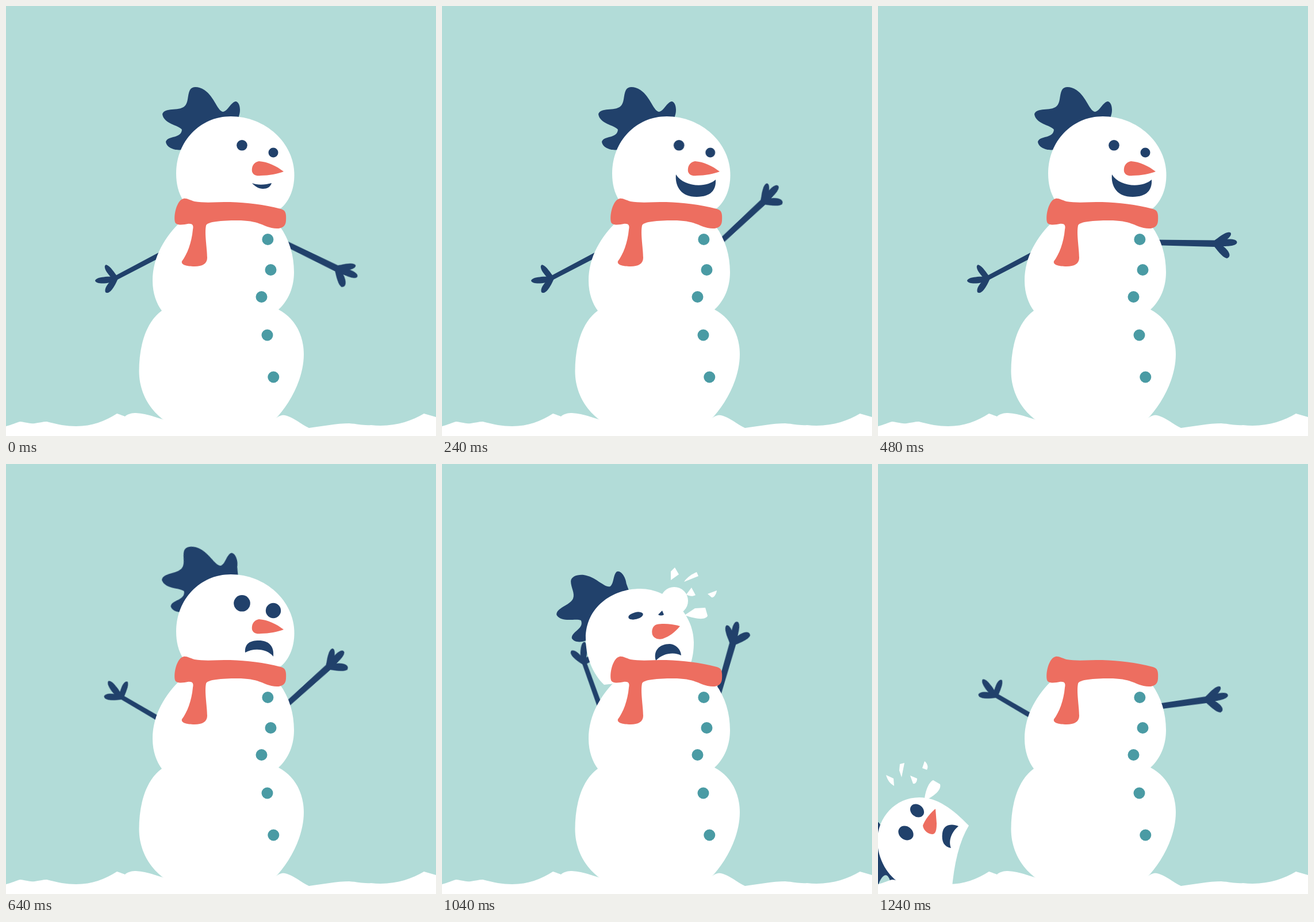
Animation, 748 px wide and 748 px high, one loop 1.34 s. Source, as an HTML page:

```html
<!DOCTYPE html>
<html lang="en">
<head>
<meta charset="utf-8">
<title>Snowman</title>
<style>
  html, body { margin: 0; width: 100%; height: 100%; overflow: hidden; background: #b2dcd8; }
  svg { display: block; width: 100vw; height: 100vh; }

  .navy { fill: #21416b; }
  .coral { fill: #ed6e60; }
  .teal { fill: #4a9ba4; }
  .white { fill: #fff; }

  .anim { animation: 1340ms step-end infinite; }
  .arm-r { animation-name: arm-r; transform-origin: 483px 411px; }
  .arm-l { animation-name: arm-l; transform-origin: 257px 438px; }
  .hair { animation-name: hair; transform-origin: 337px 179px; }
  .eyes { animation-name: glance; }
  .smile { animation-name: smile; }
  .grin { animation-name: grin; transform-origin: 444px 309px; }
  .calm { animation-name: calm; }
  .scared { animation-name: scared; }
  .head { animation-name: head; }
  .hit { animation-name: hit; }
  .fallen { animation-name: fallen; transform-origin: 75px 660px; }
  .ball { animation-name: ball; }

  @keyframes arm-r {
    0% { transform: rotate(25deg); }
    4.47% { transform: rotate(14deg); }
    8.95% { transform: rotate(-8deg); }
    13.43% { transform: rotate(-30deg); }
    17.91% { transform: rotate(-44deg); }
    22.38% { transform: rotate(-46deg); }
    26.86% { transform: rotate(-38deg); }
    31.34% { transform: rotate(-20deg); }
    35.82% { transform: rotate(0deg); }
    40.29% { transform: rotate(-6deg); }
    47.76% { transform: translate(1px, 11px) rotate(-43deg); }
    55.22% { transform: translate(4px, 20px) rotate(-61deg); }
    62.68% { transform: translate(7px, 27px) rotate(-75deg); }
    70.14% { transform: translate(3px, 16px) rotate(-76deg); }
    77.61% { transform: translate(-6px, 0) rotate(-75deg); }
    85.07% { transform: translate(-10px, 8px) rotate(-58deg); }
    92.53%, 100% { transform: translate(-14px, 13px) rotate(-9deg); }
  }
  @keyframes arm-l {
    0% { transform: none; }
    47.76% { transform: translate(9px, 5px) rotate(58deg); }
    55.22% { transform: translate(8px, 3px) rotate(71deg); }
    62.68% { transform: translate(6px, 1px) rotate(82deg); }
    70.14% { transform: translate(10px, -9px) rotate(90deg); }
    77.61% { transform: translate(16px, -22px) rotate(98deg); }
    85.07% { transform: translate(15px, -12px) rotate(82deg); }
    92.53%, 100% { transform: translate(13px, 2px) rotate(58deg); }
  }
  @keyframes hair {
    0% { transform: none; }
    47.76% { transform: translate(-4px, 1px) rotate(-11.5deg); }
    55.22% { transform: translate(-2px, 0) rotate(-5deg); }
    62.68%, 100% { transform: none; }
  }
  @keyframes glance {
    0% { transform: none; }
    13.43% { transform: translateX(1.7px); }
    31.34%, 100% { transform: none; }
  }
  @keyframes smile {
    0% { opacity: 1; }
    4.47%, 100% { opacity: 0; }
  }
  @keyframes grin {
    0% { opacity: 0; transform: scale(.5); }
    4.47% { opacity: 1; transform: scale(.6); }
    8.95% { opacity: 1; transform: scale(.75); }
    13.43% { opacity: 1; transform: scale(.9); }
    17.91%, 100% { opacity: 1; transform: none; }
  }
  @keyframes calm {
    0% { opacity: 1; }
    47.76%, 100% { opacity: 0; }
  }
  @keyframes scared {
    0% { opacity: 0; }
    47.76%, 100% { opacity: 1; }
  }
  @keyframes head {
    0% { opacity: 1; }
    77.61%, 100% { opacity: 0; }
  }
  @keyframes hit {
    0% { opacity: 0; }
    77.61% { opacity: 1; }
    85.07%, 100% { opacity: 0; }
  }
  @keyframes fallen {
    0% { opacity: 0; transform: none; }
    85.07% { opacity: 1; transform: translate(120px, -220px) rotate(33deg); }
    92.53%, 100% { opacity: 1; transform: none; }
  }
  @keyframes ball {
    0% { opacity: 0; transform: none; }
    55.22% { opacity: 1; transform: translate(738px, 247px); }
    62.68% { opacity: 1; transform: translate(621.5px, 246px); }
    70.14% { opacity: 1; transform: translate(510px, 242px); }
    77.61%, 100% { opacity: 0; transform: none; }
  }
</style>
</head>
<body>
<svg viewBox="0 0 748 748">
  <defs>
    <path id="tuft" d="M402 220L405 192C409 182 407 166 399 166C391 168 386 182 378 184C368 184 363 158 345 146C335 140 324 139 320 146C315 156 318 168 310 175C300 183 276 176 272 188C274 205 300 207 306 215C305 231 282 225 278 236C279 247 295 252 306 250L340 240Z"/>
  </defs>

  <g class="anim arm-r navy">
    <path d="M478 406.500L585 407.500L592 413L585 419L478 416Z"/>
    <path d="M582 410C595 401 606 391 613 394C618 399 605 409 592 416Z"/>
    <path d="M586 410C600 405 624 403 624.500 411C624 419 602 418 588 418Z"/>
    <path d="M581 414C590 424 598 437 607 439C616 436 612 424 592 412Z"/>
  </g>
  <g class="anim arm-l navy">
    <path d="M271 426L194 467L186 472L190 478L275 434Z"/>
    <path d="M196 473C188 464 182 452 174 450C168 453 175 465 186 475Z"/>
    <path d="M194 470C180 471 157 470 155 478C157 485 180 483 192 478Z"/>
    <path d="M187 473C180 480 170 490 173 498C178 502 186 495 195 474Z"/>
  </g>

  <g class="anim head">
    <use href="#tuft" class="anim hair navy"/>
    <path class="white" d="M308 338C300 325 296 310 296 291C296 235 338 192 391 192C451 192 501.500 238 501.500 294C501.500 320 492 340 478 352Q395 372 308 338Z"/>
    <path class="coral" d="M483 288C470 278 455 271 440 270C430 272 427 280 428 288C430 294 435 296 443 295C458 295 472 292 483 288Z"/>
    <g class="anim calm navy">
      <g class="anim eyes">
        <circle cx="410.5" cy="242.3" r="9.3"/>
        <circle cx="465" cy="255" r="8.5"/>
      </g>
      <path class="anim smile" d="M428 308C437 312 452 311 462 308C460 315 454 318 447 318C440 318 433 314 428 308Z"/>
      <path class="anim grin" d="M407 293C420 315 460 317 476 302C477 318 470 332 443 332C413 332 405 310 407 293Z"/>
    </g>
    <g class="anim scared navy">
      <circle cx="410.5" cy="242.3" r="14.3"/>
      <circle cx="465" cy="255" r="13.2"/>
      <path d="M416 328C415 312 425 307 440 307C456 307 467 316 465 335C455 322 432 319 416 328Z"/>
    </g>
  </g>

  <g class="anim hit">
    <use href="#tuft" class="navy" transform="translate(-127.5 213) rotate(-26)"/>
    <path class="white" d="M282 384C262 365 250 335 250 303C250 250 295 217 345 217C395 217 438 262 438 310C438 325 436 338 431 352Q350 358 300 382Z"/>
    <g class="navy">
      <ellipse cx="337" cy="264" rx="13" ry="6" transform="rotate(-14 337 264)"/>
      <path d="M376 262L383 255L386 262C383 264 379 264 376 262Z"/>
      <path d="M372 342C367 325 378 313 396 313C409 314 416 325 416 333C405 327 385 328 372 342Z"/>
    </g>
    <path class="coral" d="M414 282C400 278 385 277 374 279C366 281 364 290 366 297C369 304 377 306 384 304C395 300 405 293 414 282Z"/>
    <g class="white">
      <circle cx="404" cy="238" r="24"/>
      <path d="M422 263L440 251L458 250L462 264C459 271 445 271 422 263Z"/>
      <path d="M398 187L405 180L412 192L398 202Z"/>
      <path d="M421 205C427 196 436 191 443 188L446 195Z"/>
      <path d="M425 227L434 215L441 228C436 231 430 230 425 227Z"/>
      <path d="M462 226L478 220C477 228 472 233 469 232Z"/>
    </g>
  </g>

  <g class="anim fallen">
    <path class="navy" d="M6 632C3 622 -8 615 -18 618C-26 624 -14 634 -20 640C-34 642 -52 642 -58 654C-60 668 -44 674 -42 686C-46 700 -54 712 -44 720C-30 726 -18 710 -8 716C-4 722 -2 728 0 734C5 718 12 712 17 717C21 722 22 727 22 734L44 734L40 680Z"/>
    <path class="white" d="M158 629C130 600 103 580 72 580C30 580 -1 615 -1 655C-1 688 18 718 40 730C64 748 100 752 128 746Q134 668 158 629Z"/>
    <g class="navy">
      <ellipse cx="68" cy="603" rx="13" ry="10.5" transform="rotate(40 68 603)"/>
      <ellipse cx="48.5" cy="642" rx="14" ry="11.5" transform="rotate(38 48.5 642)"/>
      <path d="M140 630C128 625 114 627 112 642C110 657 115 666 127 668C122 655 128 640 140 630Z"/>
    </g>
    <path class="coral" d="M100 600C96 602 82 617 78 629C79 638 88 644 95 644C100 643 102 638 102 625Z"/>
    <g class="white">
      <path d="M81 582C83 565 90 552 96 550L108 557C111 568 95 578 88 582Z"/>
      <path d="M14 541L27 547L28 560C22 556 17 552 14 541Z"/>
      <path d="M38 522L46 520L41 545L37 533Z"/>
      <path d="M81 517C86 521 88 527 85 532L77 529Z"/>
      <path d="M56 542L68 547C68 553 65 557 61 556Z"/>
    </g>
  </g>

  <path class="white" d="M304 375C278 400 255 435 255 478C255 500 262 518 271 530C243 550 231.500 592 231.500 635C231.500 674 252 705 277 722L467 720C492 695 518 650 518 606C518 573 503 543 474 528C492 512 501 488 501 463C501 434 493 406 476 383C440 370 350 368 304 375Z"/>
  <path class="coral" d="M309 335C298 337 291 362 294 376C297 383 310 380 316 379C324 378 327 381 325 389C323 412 315 432 306 444C304 450 314 453 328 453C342 453 350 448 350 438C350 422 345 396 348 382C350 375 375 373 402 373C440 373 447 383 462 386C476 389 486 386 487 374C488 360 486 355 478 353C448 345 420 342 390 341C365 341 345 343 328 340C320 338 315 334 309 335Z"/>
  <g class="teal">
    <circle cx="455.4" cy="406" r="10"/>
    <circle cx="460.5" cy="459" r="10"/>
    <circle cx="444.5" cy="506" r="10"/>
    <circle cx="454.5" cy="572.5" r="10"/>
    <circle cx="465.3" cy="645.5" r="10"/>
  </g>

  <path class="white" d="M0 731C10 729 18 724 25 723C38 725 45 727 50 726C58 725 64 723 71 723C90 728 105 731 122 731C150 731 172 722 193 709C200 711 204 713 207 714C212 709 220 708 226 708C244 709 260 715 276 720L467 719C474 713 480 711 485 712C500 715 512 727 527 734C550 731 575 726 597 726C612 727 622 730 635 729C672 733 704 723 727 709L748 715V748H0Z"/>
  <circle class="anim ball white" r="31.5"/>
</svg>
</body>
</html>
```
